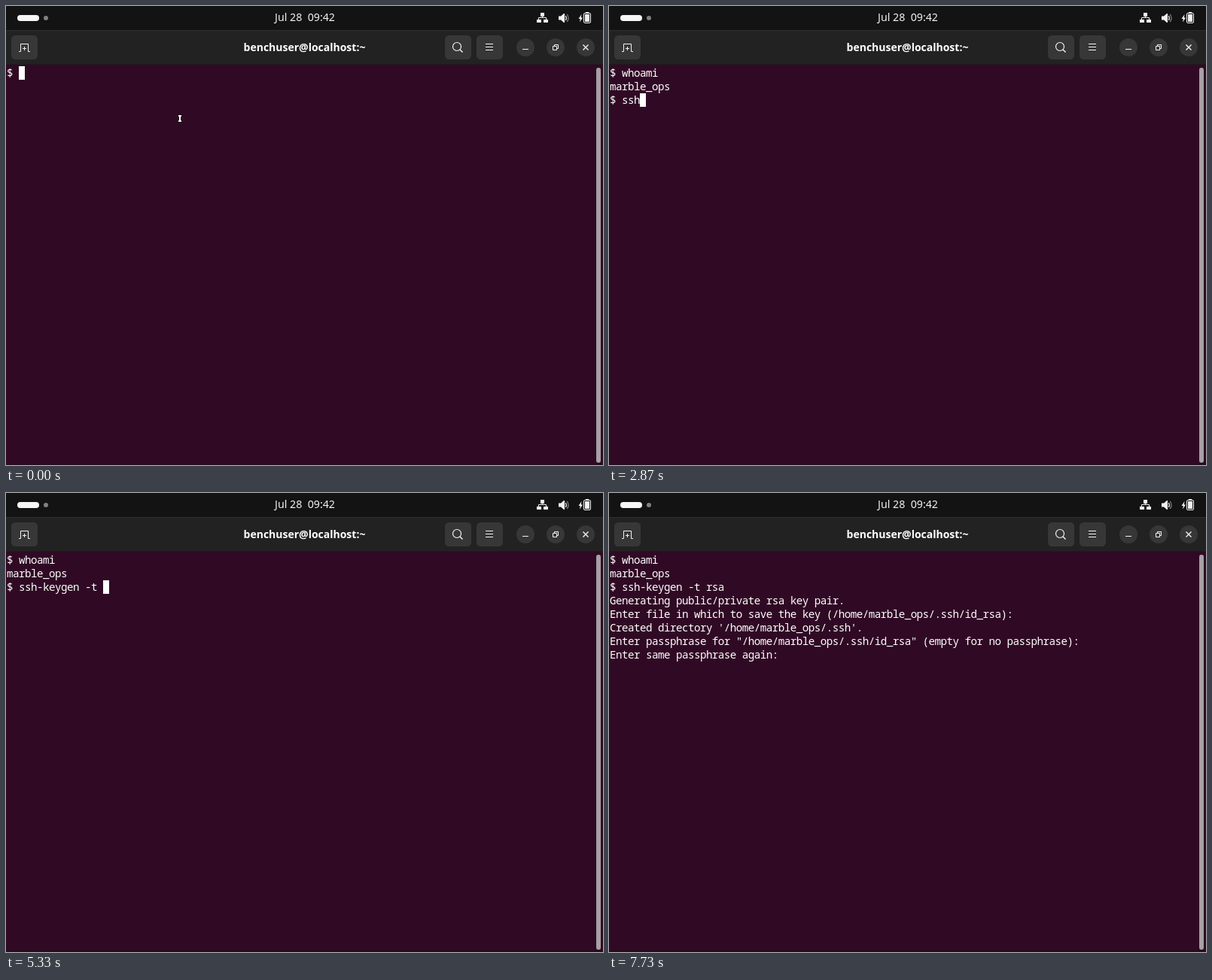
An HTML page that plays this animation: 793 by 610 pixels, repeating every 8 s.

```html
<!DOCTYPE html>
<html lang="en">
<head>
<meta charset="utf-8">
<title>Terminal</title>
<style>
  html, body { margin: 0; width: 100%; height: 100%; overflow: hidden; background: #300a24; }
  #stage { position: relative; width: 793px; height: 610px; overflow: hidden; background: #300a24; }
  svg { position: absolute; left: 0; top: 0; }
  .clock, .title {
    position: absolute; left: 0; width: 793px; text-align: center; white-space: pre;
    font-family: "Noto Sans", "Open Sans", sans-serif; line-height: 20px;
  }
  .clock { top: 5px; width: 794px; font-size: 14.2px; color: #f2f2f2; }
  .title { top: 45px; font-size: 14px; font-weight: 700; color: #fff; }
  #text {
    position: absolute; left: 1px; top: 80px; margin: 0; color: #fff;
    font: 14.2px/18px "Noto Sans Mono", "DejaVu Sans Mono", monospace;
    letter-spacing: -.52px; font-variant-ligatures: none;
  }
  #cursor { position: absolute; left: 1px; top: 80px; width: 8px; height: 18px; background: #fff; }
</style>
</head>
<body>
<div id="stage">
  <svg width="793" height="610" viewBox="0 0 793 610" fill="none">
    <!-- top panel -->
    <path fill="#131313" d="M0 0h793v32H0z"/>
    <rect x="15" y="12" width="29" height="8" rx="4" fill="#f6f6f6"/>
    <circle cx="53" cy="16" r="3" fill="#808080"/>
    <g fill="#f2f2f2">
      <path d="M710 9h5v5h-5zM705 18h6v4h-6zM714 18h6v4h-6z"/>
      <path d="M734 13.500h3l4-3.500h1v12h-1l-4-3.500h-3z"/>
      <path d="M764.500 11l-4 6h2.300l-.8 4.500 4-6h-2.300z"/>
      <path d="M770 8h4v1.500h-4z"/>
      <rect x="769" y="11" width="6" height="10"/>
    </g>
    <g stroke="#f2f2f2">
      <path d="M712.500 14v2M707.500 18v-2.500h10V18"/>
      <rect x="767.500" y="9.500" width="9" height="13" rx="1.500"/>
      <path d="M743.300 13q2 3 0 6" stroke-width="1.300"/>
    </g>
    <path d="M745.300 11q3.500 5 0 10" stroke="#8a8a8a" stroke-width="1.200"/>

    <!-- header bar -->
    <path fill="#222" d="M0 33h793v45H0z"/>
    <path fill="#303030" d="M0 32h793v1H0z"/>
    <path fill="#1c1c1c" d="M0 77h793v1H0z"/>
    <g fill="#373737">
      <rect x="7" y="39" width="35" height="32" rx="5.500"/>
      <rect x="583" y="39" width="35" height="32" rx="5.500"/>
      <rect x="625" y="39" width="35" height="32" rx="5.500"/>
      <circle cx="690" cy="55" r="12"/>
      <circle cx="730" cy="55" r="12"/>
      <circle cx="770" cy="55" r="12"/>
    </g>
    <g stroke="#f4f4f4">
      <path d="M17 60.500h2.500v-10h10v10h2.500M22 56.500h5M24.500 54v5"/>
      <circle cx="599" cy="54" r="5.500" stroke-width="1.200"/>
      <path d="M603 58l3.500 3.500" stroke-width="1.400"/>
      <path d="M637 50.500h10M637 54.500h10M637 58.500h10"/>
      <path d="M686 57.500h8"/>
      <path d="M726.500 53.500h5v5h-5zM728.500 53v-1.500h5v5H732"/>
      <path d="M766.500 51.500l7 7M773.500 51.500l-7 7" stroke-width="1.400"/>
    </g>

    <!-- scrollbar and lower edge -->
    <path fill="#280a1f" d="M0 608h793v2H0z"/>
    <rect x="784" y="82" width="6" height="525" rx="3" fill="#a6a0a4"/>

    <!-- text pointer -->
    <g id="pointer">
      <path d="M228 144h6v4h-1v3h1v4h-6v-4h1v-3h-1z" fill="#1a0614"/>
      <path d="M229 145h4v2h-1v5h1v2h-4v-2h1v-5h-1z" fill="#fff"/>
    </g>
  </svg>
  <div class="clock">Jul 28  09:42</div>
  <div class="title">benchuser@localhost:~</div>
  <pre id="text"></pre>
  <div id="cursor"></div>
</div>
<script>
  const LOOP = 8000, CELL = 8, LINE = 18;
  const home = '/home/marble_ops/.ssh';
  const [text, cursor, pointer] = ['text', 'cursor', 'pointer'].map(id => document.getElementById(id));

  const steps = [];
  let screen = '';
  const put = (at, added) => steps.push({ at, text: screen += added, on: true });
  const hide = at => steps.push({ at, text: screen, on: false });
  // Each pair: a time and the characters that appear then
  const type = pairs => pairs.forEach(([at, chars]) => put(at, chars));

  put(0, '$ ');
  type([[1130, 'w'], [1200, 'h'], [1330, 'o'], [1400, 'a'], [1530, 'm'], [1600, 'i']]);
  put(1730, '\n');
  put(1800, 'marble_ops\n$ ');
  hide(2400);
  type([[2670, 's'], [2800, 's'], [2870, 'h'], [3130, '-'], [3330, 'k'], [3470, 'e'],
        [3670, 'y'], [3800, 'ge'], [3930, 'n']]);
  hide(4530);
  type([[4670, ' '], [4870, '-'], [5200, 't'], [5330, ' '], [5730, 'r'], [5930, 's'], [6000, 'a']]);
  put(6130, '\nGenerating public/private rsa key pair.\n');
  put(6200, `Enter file in which to save the key (${home}/id_rsa): `);
  put(6670, '\n');
  put(6730, `Created directory '${home}'.\nEnter passphrase for "${home}/id_rsa" (empty for no passphrase): `);
  put(7200, '\nEnter same passphrase again: ');
  hide(7730);

  let shown;
  function draw(now) {
    const t = now % LOOP;
    const step = steps.findLast(s => s.at <= t);
    if (step !== shown) {
      shown = step;
      const lines = step.text.split('\n');
      const col = lines[lines.length - 1].length;
      text.textContent = step.text;
      cursor.style.transform = `translate(${col * CELL}px, ${(lines.length - 1) * LINE}px)`;
      cursor.style.visibility = step.on ? 'visible' : 'hidden';
      pointer.style.visibility = step === steps[0] ? 'visible' : 'hidden';
    }
  }

  const start = performance.now();
  function tick() {
    draw(performance.now() - start);
    requestAnimationFrame(tick);
  }
  tick();
</script>
</body>
</html>
```
